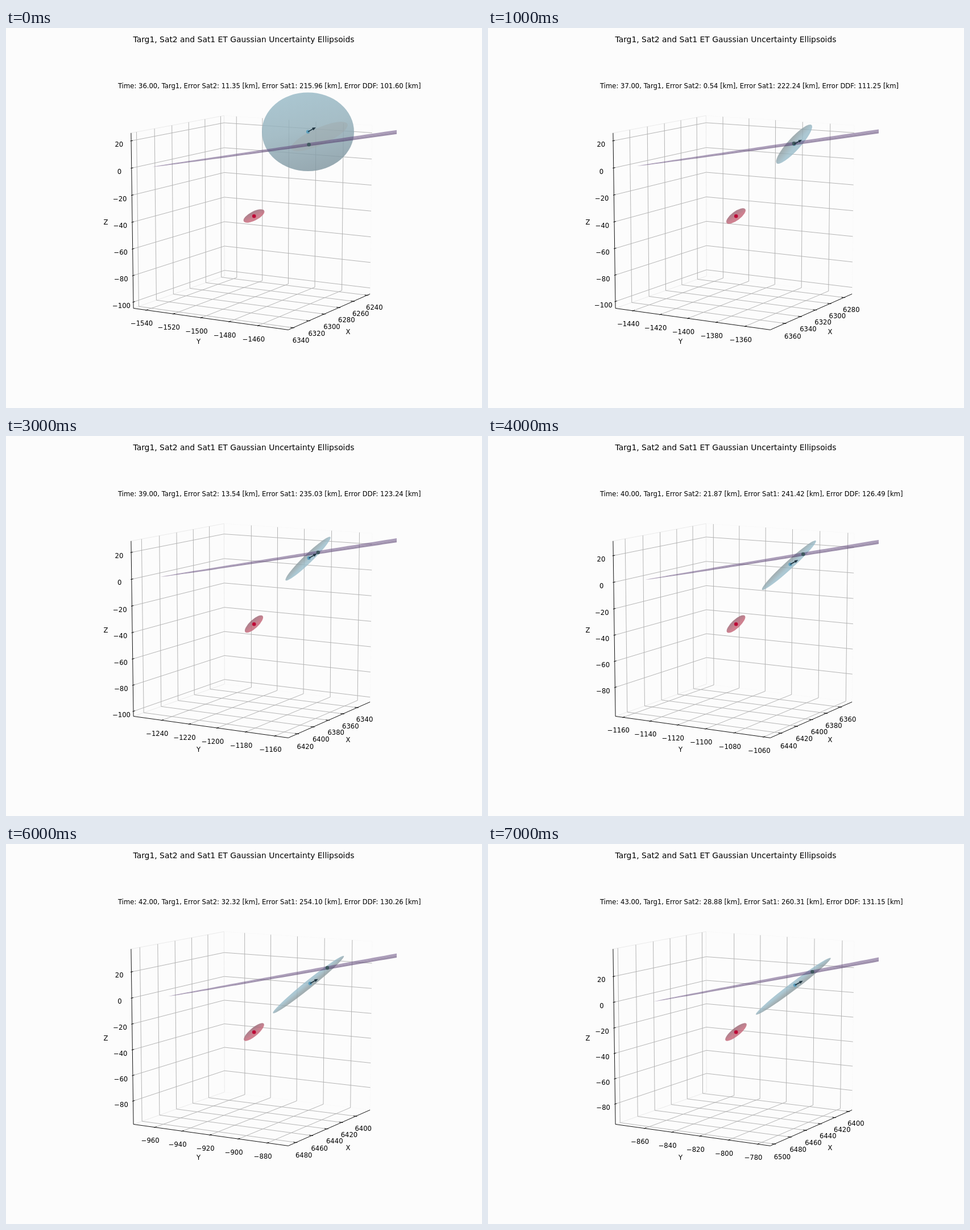
These frames come from a looping animation (837 by 669 pixels, 8 s). An HTML page:

```html
<!DOCTYPE html>
<html lang="en">
<head>
<meta charset="utf-8">
<title>Uncertainty ellipsoids</title>
<style>
  html, body { margin: 0; height: 100%; overflow: hidden; background: #fcfcfc; }
  svg { display: block; font: 11.62px "DejaVu Sans", sans-serif; }
  path { fill: none; stroke-width: .93; }
</style>
</head>
<body>
<svg width="837" height="669" viewBox="0 0 837 669">
  <defs>
    <linearGradient id="ball" x1=".35" y1="0" x2=".65" y2="1">
      <stop offset="0" stop-color="#98bac7"/><stop offset=".45" stop-color="#93b0bb"/><stop offset="1" stop-color="#7f959f"/>
    </linearGradient>
    <linearGradient id="blue" x1="0" y1="0" x2=".15" y2="1">
      <stop offset=".15" stop-color="#8c9b9f"/><stop offset=".75" stop-color="#98bbc9"/>
    </linearGradient>
    <linearGradient id="blueFlip" x1="0" y1="0" x2=".1" y2="1">
      <stop offset=".3" stop-color="#98bbc9"/><stop offset=".85" stop-color="#8c9b9f"/>
    </linearGradient>
    <linearGradient id="red" x1=".1" y1="0" x2="0" y2="1">
      <stop offset=".05" stop-color="#9c6876"/><stop offset=".65" stop-color="#c5687a"/>
    </linearGradient>
    <clipPath id="axes"><rect x="187" y="82" width="500" height="500"/></clipPath>
  </defs>
  <text x="418" y="25" font-size="13.89" text-anchor="middle">Targ1, Sat2 and Sat1 ET Gaussian Uncertainty Ellipsoids</text>
  <g id="plot"></g>
</svg>
<script>
const plot = document.getElementById('plot');
const STEP = 1000, H = 0.55, XY_SCALE = 100.2;
const LABEL = H + 0.053, TICK_IN = H - 0.018, TICK_OUT = H + 0.009;
const rad = Math.PI / 180;
const ce = Math.cos(10 * rad), se = Math.sin(10 * rad), ca = Math.cos(30 * rad), sa = Math.sin(30 * rad);

// Caption values per step: Sat2, Sat1, DDF
const errors = [
  '11.35 215.96 101.60', '0.54 222.24 111.25', '5.87 228.62 118.31', '13.54 235.03 123.24',
  '21.87 241.42 126.49', '28.63 247.77 128.74', '32.32 254.10 130.26', '28.88 260.31 131.15'
].map(s => s.split(' '));

// Perspective view of the cube [-H, H]^3, elevation 10, azimuth 30
function project([x, y, z]) {
  const toward = x * ca + y * sa;
  const f = 2794 / (10 - ce * toward - se * z);
  return [436.2 + f * (y * ca - x * sa), 330.7 - f * (ce * z - se * toward)];
}

const line = (points, color) =>
  `<path stroke="${color}" d="M${points.map(p => project(p).map(v => v.toFixed(2))).join('L')}"/>`;
const text = (x, y, s, anchor = 'middle') =>
  `<text x="${x.toFixed(2)}" y="${y.toFixed(2)}" text-anchor="${anchor}">${s}</text>`;
const dot = (x, y, r, color) => `<circle cx="${x}" cy="${y}" r="${r}" fill="${color}"/>`;
const ellipse = (x, y, a, b, angle, fill, opacity) =>
  `<ellipse rx="${a}" ry="${b}" fill="${fill}" opacity="${opacity}" transform="translate(${x} ${y}) rotate(${-angle})"/>`;

// Grid lines, ticks and labels every 20 km; each path function places value v on the cube
function axis(center, scale, gridAt, edgeAt, labelAt) {
  const half = scale * H * 0.96;
  let grid = '', front = '';
  for (let km = Math.ceil((center - half) / 20) * 20; km <= center + half; km += 20) {
    const v = (km - center) / scale;
    const [x, y] = project(labelAt(v));
    grid += line(gridAt(v), '#b0b0b0');
    front += line([edgeAt(v, TICK_IN), edgeAt(v, TICK_OUT)], '#000')
      + text(x, y + 9.4, String(km).replace('-', '\u2212'));
  }
  return { grid, front };
}

function box(n) {
  const xc = 6290.8 + 34.59 * n - 2.275 * n ** 2 + n ** 3 / 12;
  const yc = -1494.6 + 96.75 * n - 0.19 * n ** 2;
  const zc = -39.5 - 0.747 * n + 0.521 * n ** 2 - 0.0242 * n ** 3;
  const zScale = 118.6 + 0.3 * n + 0.085 * n ** 2;
  const axes = [
    axis(xc, XY_SCALE, v => [[v, -H, H], [v, -H, -H], [v, H, -H]], (v, e) => [v, e, -H], v => [v, LABEL, -LABEL]),
    axis(yc, XY_SCALE, v => [[-H, v, H], [-H, v, -H], [H, v, -H]], (v, e) => [e, v, -H], v => [LABEL, v, -LABEL]),
    axis(zc, zScale, v => [[H, -H, v], [-H, -H, v], [-H, H, v]], (v, e) => [e, -H, v], v => [LABEL, -LABEL, v])
  ];
  return line([[-H, -H, H], [-H, H, H], [-H, H, -H], [-H, -H, -H]], '#f9f9f9')
    + line([[H, -H, H], [-H, -H, H], [-H, -H, -H], [H, -H, -H]], '#e9e9e9')
    + axes.map(a => a.grid).join('')
    + line([[H, -H, H], [H, -H, -H], [H, H, -H], [-H, H, -H]], '#000')
    + axes.map(a => a.front).join('')
    + text(601.5, 539, 'X') + text(338.5, 556, 'Y') + text(175.5, 346.3, 'Z');
}

// Thin spindle from its tip to the right border of the axes
function spindle(tipX, tipY, endY) {
  const half = (side, fill) => {
    let points = `${tipX},${tipY} `;
    for (let i = 1; i <= 40; i++) {
      const d = i / 40;
      points += `${tipX + (687 - tipX) * d},${tipY + (endY - tipY) * d + side * 3.6 * d ** 0.55} `;
    }
    return `<polygon points="${points}687,${endY}" fill="${fill}"/>`;
  };
  return half(-1, 'rgba(92,64,120,.5)') + half(1, 'rgba(80,55,105,.54)');
}

function arrow(x, y, dx, dy) {
  const angle = Math.atan2(dy, dx), ex = x + dx, ey = y + dy;
  const barb = turn => `${ex - 4.5 * Math.cos(angle + turn)} ${ey - 4.5 * Math.sin(angle + turn)}`;
  return `<path stroke="#1f3440" style="stroke-width:1.6" d="M${x} ${y}L${ex} ${ey}M${barb(.4)}L${ex} ${ey}L${barb(-.4)}"/>`;
}

// Sat2 starts as a ball, then becomes a needle that lags the truth and stretches
function sat2(n, trueX) {
  if (n === 0) return {
    x: 531, y: 182.7,
    shape: ellipse(531, 182.7, 81, 69.3, 0, 'url(#ball)', 0.82) + ellipse(551, 191, 54, 15, 24, '#9fa6a6', 0.4)
  };
  const swing = Math.sin((n - 4) * 30 * rad), lag = Math.sin((n - 1) * 16 * rad);
  const x = trueX - 34 * lag + 0.3, y = 227.5 + 23 * swing;
  const fill = n < 5 ? 'blue' : 'blueFlip';
  return {
    x: x + 3 * lag, y: y - 2 * lag,
    shape: ellipse(x, y, 64 + 18.5 * swing, 6 + 5 / n, 49.4 - 1.75 * n, `url(#${fill})`, 0.8)
  };
}

function draw(n) {
  const [e2, e1, ed] = errors[n];
  const tipX = 257 + 4.8 * n, tipY = 243 + 1.5 * Math.abs(n - 1) ** 1.75;
  const endY = 181.9 + 0.68 * (n - 1.4) ** 2;
  const trueX = 532.6 + 5.4 * n;
  const trueY = tipY + (endY - tipY) * (trueX - tipX) / (687 - tipX);
  const mean = sat2(n, trueX);
  plot.innerHTML =
    text(197, 106.4, `Time: ${36 + n}.00, Targ1, Error Sat2: ${e2} [km], Error Sat1: ${e1} [km], Error DDF: ${ed} [km]`, 'start')
    + box(n)
    + '<g clip-path="url(#axes)">'
    + mean.shape
    + dot(mean.x, mean.y, 3.1, '#5d9fbd')
    + spindle(tipX, tipY, endY)
    + dot(trueX, trueY, 3.3, '#40595f')
    + arrow(mean.x, mean.y, 12, -6.8)
    + ellipse(436, 331, 20.3 + 0.065 * n ** 2, 8 - n / 7, 27.4 + 12.7 * n * Math.exp(-n / 3.4), 'url(#red)', 0.83)
    + dot(436.2, 331.2, 3.3, '#be0a37')
    + '</g>';
}

const start = performance.now();
let shown = -1;
function loop() {
  const n = Math.floor((performance.now() - start) / STEP) % errors.length;
  if (n !== shown) draw(shown = n);
  requestAnimationFrame(loop);
}
loop();
</script>
</body>
</html>
```
